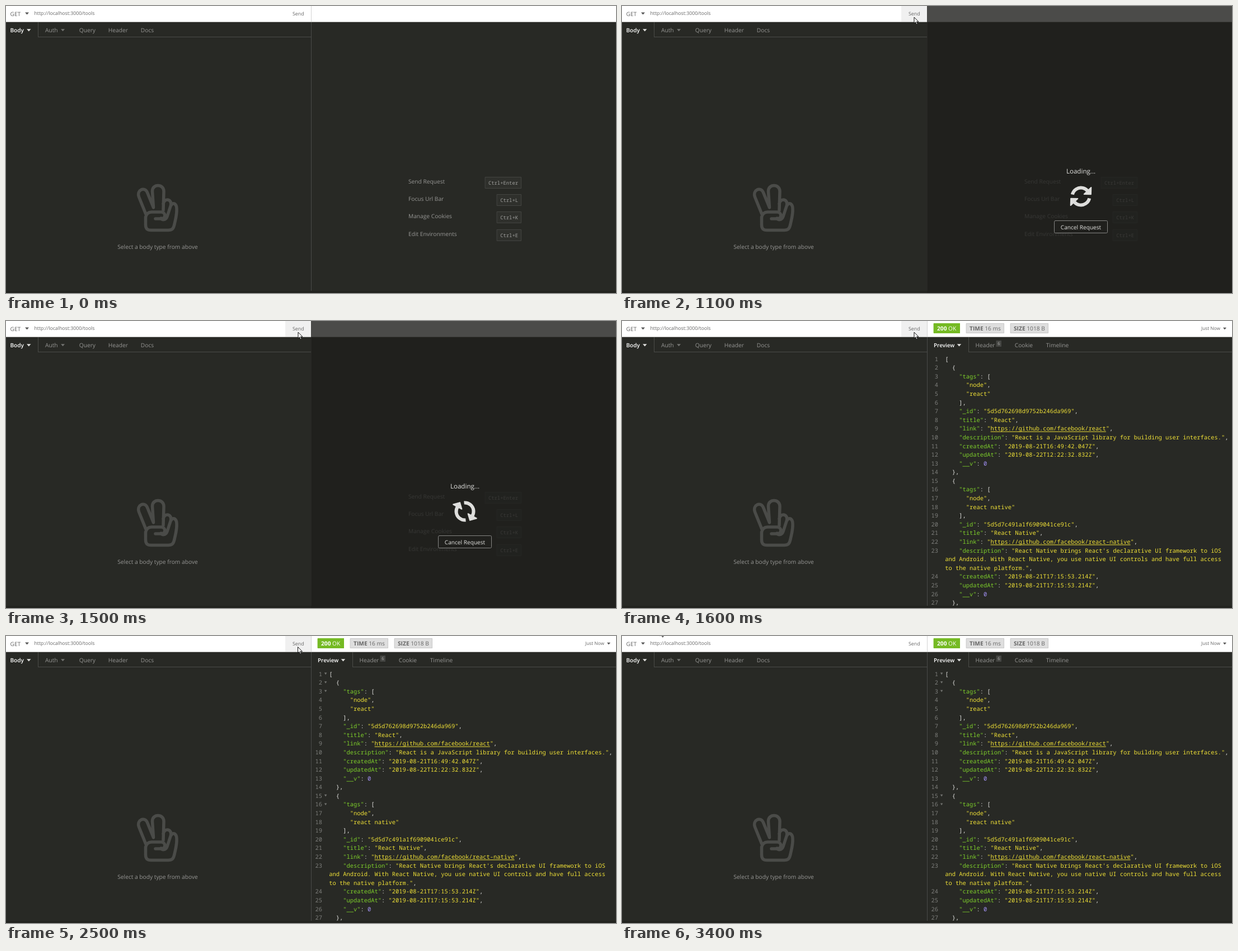
An HTML page with a canvas for the animation above (3.5 s loop, 1090 by 514 pixels).

```html
<!DOCTYPE html>
<html lang="en">
<head>
<meta charset="utf-8">
<title>API client</title>
<style>
html, body { margin: 0; overflow: hidden; background: #282925; }
canvas { display: block; }
</style>
</head>
<body>
<canvas width="1090" height="514"></canvas>
<script>
const ctx = document.querySelector('canvas').getContext('2d');
const LOOP = 3500, STEP = 100;
const BG = '#282925', LINE = '#4a4b48', FAINT = '#969694', LIGHT = '#e2e2e0', DARK = '#666';
const GREEN = '#7ecf2b', YELLOW = '#f0e137', PURPLE = '#a896ff';
const SANS = '"Open Sans", "Noto Sans", sans-serif';
const MONO = '"Noto Sans Mono", "DejaVu Sans Mono", monospace';
const CHAR = 6.25, ROW = 15.59, CODE_X = 577.3, CODE_Y = 71.6;

const CODE = `[
  {
    "tags": [
      "node",
      "react"
    ],
    "_id": "5d5d762698d9752b246da969",
    "title": "React",
    "link": "https://github.com/facebook/react",
    "description": "React is a JavaScript library for building user interfaces.",
    "createdAt": "2019-08-21T16:49:42.047Z",
    "updatedAt": "2019-08-22T12:22:32.832Z",
    "__v": 0
  },
  {
    "tags": [
      "node",
      "react native"
    ],
    "_id": "5d5d7c491a1f6909041ce91c",
    "title": "React Native",
    "link": "https://github.com/facebook/react-native",
    "description": "React Native brings React's declarative UI framework to iOS
and Android. With React Native, you use native UI controls and have full access
to the native platform.",
    "createdAt": "2019-08-21T17:15:53.214Z",
    "updatedAt": "2019-08-21T17:15:53.214Z",
    "__v": 0
  },`;

const HAND = new Path2D(`
  M250 373 L237.5 342 C233 329 248 323 252.5 334 L263.5 361 L261.5 332 C261 318 282 318 282 332 L281 366
  M281 354 C284 343 297 346 294.5 357 L288 377 C285 385 278 383 277 380
  M295 357 C299 350 305 355 305 363 C305.5 374 303 381 301 391 C299 399 297 401.5 290 401.5
  L259 401.5 C252 401.5 249.5 398 249.5 392 L249.5 378 C251 372 255 369 260 369
  L277 369 C286 369 286 381 277 381 L267 381`);
const ARROW = new Path2D('M0 0 V10.5 L2.5 8.3 L4.2 12.3 L6 11.5 L4.3 7.7 H7.5 Z');

function rect(x, y, w, h, color) {
  ctx.fillStyle = color;
  ctx.fillRect(x, y, w, h);
}

function frame(x, y, w, h, color, radius = 0) {
  ctx.strokeStyle = color;
  ctx.lineWidth = 1;
  ctx.beginPath();
  ctx.roundRect(x + .5, y + .5, w - 1, h - 1, radius);
  ctx.stroke();
}

function text(str, x, y, color, size = 10.2, { weight = 400, family = SANS, align = 'left' } = {}) {
  ctx.font = `${weight} ${size}px ${family}`;
  ctx.fillStyle = color;
  ctx.textAlign = align;
  ctx.fillText(str, x, y);
  return ctx.measureText(str).width;
}

function caret(x, y, w, h, color) {
  ctx.fillStyle = color;
  ctx.beginPath();
  ctx.moveTo(x, y);
  ctx.lineTo(x + w, y);
  ctx.lineTo(x + w / 2, y + h);
  ctx.fill();
}

function tabBorder(x, right) {
  rect(x, 29, 1, 27, LINE);
  rect(x, 55, right - x, 1, LINE);
}

function drawBase(hover) {
  rect(0, 0, 1090, 514, BG);
  rect(0, 0, 1090, 28, '#fff');
  rect(0, 28, 1090, 1, '#b9b9b7');
  rect(0, 510, 1090, 4, '#22231f');
  if (hover) rect(499, 0, 46, 28, '#f0f0f0');
  rect(545, 0, 1, 28, '#d4d4d4');
  rect(545, 29, 1, 481, LINE);

  text('GET', 7.5, 17.6, DARK);
  caret(34, 11.5, 7, 4, '#555');
  text('http://localhost:3000/tools', 50.5, 16.4, DARK, 8.75);
  text('Send', 512, 16.8, DARK, 8.8);

  tabBorder(57, 545);
  text('Body', 7.5, 46.8, '#fff', 10, { weight: 600 });
  caret(37, 41.3, 7.5, 4.2, LIGHT);
  text('Auth', 70, 46.8, FAINT);
  caret(98, 41.3, 7, 4, '#737471');
  text('Query', 130.8, 46.8, FAINT);
  text('Header', 182.8, 46.8, FAINT);
  text('Docs', 240.8, 46.8, FAINT);

  ctx.strokeStyle = LINE;
  ctx.lineWidth = 5.5;
  ctx.lineJoin = ctx.lineCap = 'round';
  ctx.stroke(HAND);
  text('Select a body type from above', 271, 434.7, FAINT, 10.23, { align: 'center' });
}

function drawShortcuts() {
  const rows = [['Send Request', 'Enter', 65], ['Focus Url Bar', 'L', 44],
    ['Manage Cookies', 'K', 44], ['Edit Environments', 'E', 44]];
  rows.forEach(([label, key, w], i) => {
    const y = Math.round(306 + i * 31.2);
    text(label, 719, y + 12.2, FAINT);
    rect(921 - w, y, w, 21, '#2f302c');
    frame(921 - w, y, w, 21, '#434441');
    text('Ctrl+' + key, 915, y + 13.6, '#a0a09e', 8.85, { family: MONO, align: 'right' });
  });
}

function drawSpinner(angle) {
  ctx.save();
  ctx.translate(820, 341);
  ctx.rotate(angle);
  ctx.strokeStyle = ctx.fillStyle = '#dededc';
  ctx.lineCap = 'butt';
  for (let i = 0; i < 2; i++) {
    ctx.lineWidth = 6;
    ctx.beginPath();
    ctx.arc(0, 0, 15.5, Math.PI * 1.06, Math.PI * 1.76);
    ctx.stroke();
    ctx.lineWidth = 2;
    ctx.beginPath();
    ctx.moveTo(17.8, -16.5);
    ctx.lineTo(17.8, -4.2);
    ctx.lineTo(5.6, -4.2);
    ctx.closePath();
    ctx.fill();
    ctx.stroke();
    ctx.rotate(Math.PI);
  }
  ctx.restore();
}

function drawLoading(t) {
  drawShortcuts();
  rect(545, 0, 545, 514, 'rgba(30,30,28,.8)');
  text('Loading...', 820, 299.6, LIGHT, 11.6, { align: 'center' });
  drawSpinner((t - 1100) / 2000 * Math.PI * 2 + .03);
  frame(772, 384, 96, 23, '#858583', 2);
  text('Cancel Request', 820, 399.9, LIGHT, 10.15, { align: 'center' });
}

function drawBadge(x, w, fill, border, color, strong, rest) {
  rect(x, 4, w, 18, fill);
  frame(x, 4, w, 18, border);
  const used = text(strong, x + 6, 16.9, color, 10.2, { weight: 700 });
  text(' ' + rest, x + 6 + used, 16.9, color);
}

function drawCode(folds) {
  let row = 0, col = 0, number = 1;
  const numberLine = () =>
    text(number++, 565, CODE_Y + row * ROW, '#7d7e7b', 10.4, { family: MONO, align: 'right' });
  numberLine();
  for (const token of CODE.match(/"[^"]*"|\d+|[^"\d]/g)) {
    const quoted = token[0] === '"';
    // A key is followed by a colon and never holds a space, dot or capital start.
    const isKey = quoted && CODE.includes('    ' + token + ':');
    const color = isKey ? GREEN : quoted ? YELLOW : /\d/.test(token) ? PURPLE : LIGHT;
    if (token.startsWith('"http'))
      rect(CODE_X + (col + 1) * CHAR, CODE_Y + row * ROW + 1.4, (token.length - 2) * CHAR, 1, YELLOW);
    for (const ch of token) {
      if (ch === '\n') {
        row++;
        col = 0;
        if (!quoted) numberLine();
      } else {
        if (ch !== ' ')
          text(ch, CODE_X + col * CHAR, CODE_Y + row * ROW, color, 10.42, { family: MONO });
        col++;
      }
    }
  }
  if (folds)
    for (const r of [0, 1, 2, 14, 15]) caret(568.8, 65.6 + r * ROW, 4.6, 3.8, '#71726f');
}

function drawResponse(t) {
  drawBadge(557, 47, '#75ba24', '#75ba24', '#fff', '200', 'OK');
  drawBadge(615, 68, '#dedede', '#c8c8c8', DARK, 'TIME', '16 ms');
  drawBadge(694, 68, '#dedede', '#c8c8c8', DARK, 'SIZE', '1018 B');
  text('Just Now', 1035, 16.3, DARK, 8.3);
  caret(1074, 11.8, 6, 3.6, '#555');

  tabBorder(619, 1090);
  text('Preview', 557, 46.8, '#fff', 9.9, { weight: 600 });
  caret(598.7, 41.3, 7.5, 4.2, LIGHT);
  text('Header', 631.5, 46.8, FAINT);
  rect(668.5, 35, 9.5, 11, '#454643');
  text('6', 673.3, 43.3, '#b0b0ae', 7.5, { align: 'center' });
  text('Cookie', 701.7, 46.8, FAINT);
  text('Timeline', 757.7, 46.8, FAINT);
  drawCode(t >= 1800);
}

function cursorAt(t) {
  if (t >= 3200) {
    const p = (t - 3200) / 200;
    return [70 - 2 * p, -11.6 + 1.2 * p];
  }
  if (t < 400 || t >= 2600) return null;
  if (t >= 2500) return [521.5, 20];
  const left = (1 - Math.min(1, (t - 400) / 300)) ** 2;
  return [522 + 18 * left, 20.5 - 9 * left];
}

function drawCursor([x, y]) {
  ctx.save();
  ctx.translate(x, y);
  ctx.fillStyle = '#fff';
  ctx.strokeStyle = '#111';
  ctx.lineWidth = 1;
  ctx.lineJoin = 'miter';
  ctx.fill(ARROW);
  ctx.stroke(ARROW);
  ctx.restore();
}

function draw(now) {
  const t = Math.floor(now % LOOP / STEP) * STEP;
  ctx.textRendering = 'geometricPrecision';
  drawBase(t >= 400 && t < 2600);
  if (t < 1100) drawShortcuts();
  else if (t < 1600) drawLoading(t);
  else drawResponse(t);
  const cursor = cursorAt(t);
  if (cursor) drawCursor(cursor);
  requestAnimationFrame(draw);
}

draw(performance.now());
</script>
</body>
</html>
```
